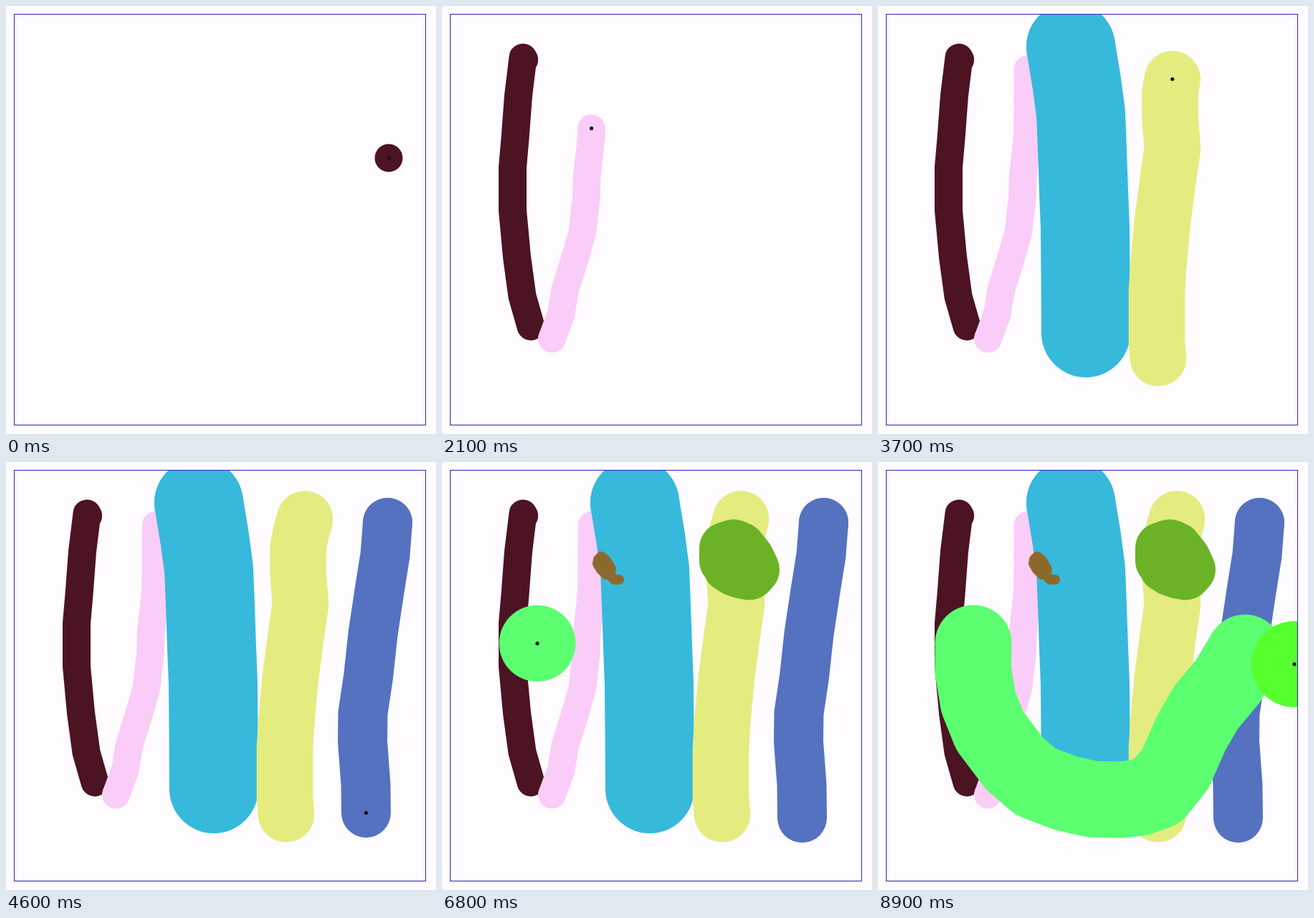
These frames come from a looping animation (600x597 px, 9 s). An HTML page with a canvas:

```html
<!DOCTYPE html>
<html lang="en">
<head>
<meta charset="utf-8">
<title>Brush strokes</title>
<style>
  html, body { margin: 0; width: 100%; height: 100%; overflow: hidden; background: #fefcff; }
  canvas { display: block; }
</style>
</head>
<body>
<canvas id="stage" width="600" height="597"></canvas>
<script>
const LOOP = 9000, STEP = 100;
const ctx = document.getElementById("stage").getContext("2d");

// Each brush hovers from the previous end to its first point (from..arrive), then paints (down..up).
const strokes = [
  { color: "#4c1322", r: 19.5, from: 0, arrive: 1000, down: 1000, up: 1550,
    pts: "114.5,75 113,72 106.5,125 102,185 98.5,225 98.5,285 104.5,350 112,405 124,447" },
  { color: "#facdf8", r: 19.3, from: 1550, arrive: 1650, down: 1650, up: 2300,
    pts: "153.5,464 166,430 172,395 186,350 196,315 201.5,265 202,240 208.5,180 209,88" },
  { color: "#37b9dc", r: 62, from: 2300, arrive: 2500, down: 2500, up: 3100,
    pts: "269,57 277,105 283,150 285,200 287,258 289,310 289.5,375 290,456" },
  { color: "#e4ec80", r: 39.3, from: 3100, arrive: 3200, down: 3200, up: 3790,
    pts: "391,491 389,470 389,400 391,365 397,300 405,240 411,198 407.5,155 407.5,120 411,101 417,79.5" },
  { color: "#5472c0", r: 34.5, from: 3790, arrive: 4000, down: 4050, up: 4650,
    pts: "532.5,84.5 529,130 521,180 512,240 505.5,300 498,350 497.5,390 502,450 502.5,496.5" },
  { color: "#8c6a2d", r: 7, from: 4650, arrive: 5050, down: 5050, up: 5500,
    pts: "222,132 218,136 217,142 222,150 229,157 234,155 236,149 228,136 222,132 228,150 240,164 247,164" },
  { color: "#6cb226", r: 36, from: 5500, arrive: 5800, down: 6000, up: 6500,
    pts: "400.5,144.5 395,138 395,120 407,116 416,120 428,135 435,150 429,156.5 420,155 408,151 400,146" },
  { color: "#5bff70", r: 53.3, from: 6500, arrive: 6800, down: 6850, up: 7800,
    pts: "133,253 132.5,290 140,335 156,375 190,420 220,446 262,462 300,470.5 340,471 365,468 " +
         "390,459 415,428 437,378 458,342 488,306 512,266" },
  { color: "#57ff2e", r: 60, from: 7800, arrive: 8200, down: LOOP, up: LOOP, pts: "581,282" }
];

let last = [534, 212];
for (const s of strokes) {
  s.pts = s.pts.split(" ").map(p => p.split(",").map(Number));
  s.origin = last;
  last = s.pts[s.pts.length - 1];
}

const clamp = u => Math.max(0, Math.min(1, u));
const ease = u => (1 - Math.cos(Math.PI * clamp(u))) / 2;
const mix = (a, b, u) => [a[0] + (b[0] - a[0]) * u, a[1] + (b[1] - a[1]) * u];
const dist = (a, b) => Math.hypot(b[0] - a[0], b[1] - a[1]);

// The leading part of a polyline, cut at fraction u of its length.
function partial(pts, u) {
  let left = 0;
  for (let i = 1; i < pts.length; i++) left += dist(pts[i - 1], pts[i]);
  left *= u;
  const out = [pts[0]];
  for (let i = 1; i < pts.length; i++) {
    const d = dist(pts[i - 1], pts[i]);
    if (d >= left) {
      out.push(mix(pts[i - 1], pts[i], left / d));
      break;
    }
    out.push(pts[i]);
    left -= d;
  }
  return out;
}

function disc([x, y], r, color) {
  ctx.fillStyle = color;
  ctx.beginPath();
  ctx.arc(x, y, r, 0, Math.PI * 2);
  ctx.fill();
}

function brush(pts, s) {
  disc(pts[0], s.r, s.color);
  ctx.strokeStyle = s.color;
  ctx.lineWidth = s.r * 2;
  ctx.lineCap = ctx.lineJoin = "round";
  ctx.beginPath();
  pts.forEach(p => ctx.lineTo(...p));
  ctx.stroke();
}

function draw(t) {
  ctx.fillStyle = "#fefcff";
  ctx.fillRect(0, 0, 600, 597);
  ctx.save();
  ctx.beginPath();
  ctx.rect(11, 11, 575, 574);
  ctx.clip();
  let cursor = strokes[0].origin;
  for (const s of strokes) {
    if (t < s.from) break;
    if (t < s.down) {
      cursor = mix(s.origin, s.pts[0], ease((t - s.from) / (s.arrive - s.from)));
      disc(cursor, s.r, s.color);
    } else {
      const path = partial(s.pts, ease((t - s.down) / (s.up - s.down)));
      brush(path, s);
      cursor = path[path.length - 1];
    }
  }
  disc(cursor, 2.6, "#1c0c16");
  ctx.restore();
  ctx.strokeStyle = "#3023b4";
  ctx.lineWidth = 1;
  ctx.strokeRect(11.5, 11.5, 574, 573);
}

const start = performance.now();
function tick() {
  const t = (performance.now() - start) % LOOP;
  draw(Math.floor(t / STEP) * STEP);
  requestAnimationFrame(tick);
}
tick();
</script>
</body>
</html>
```
